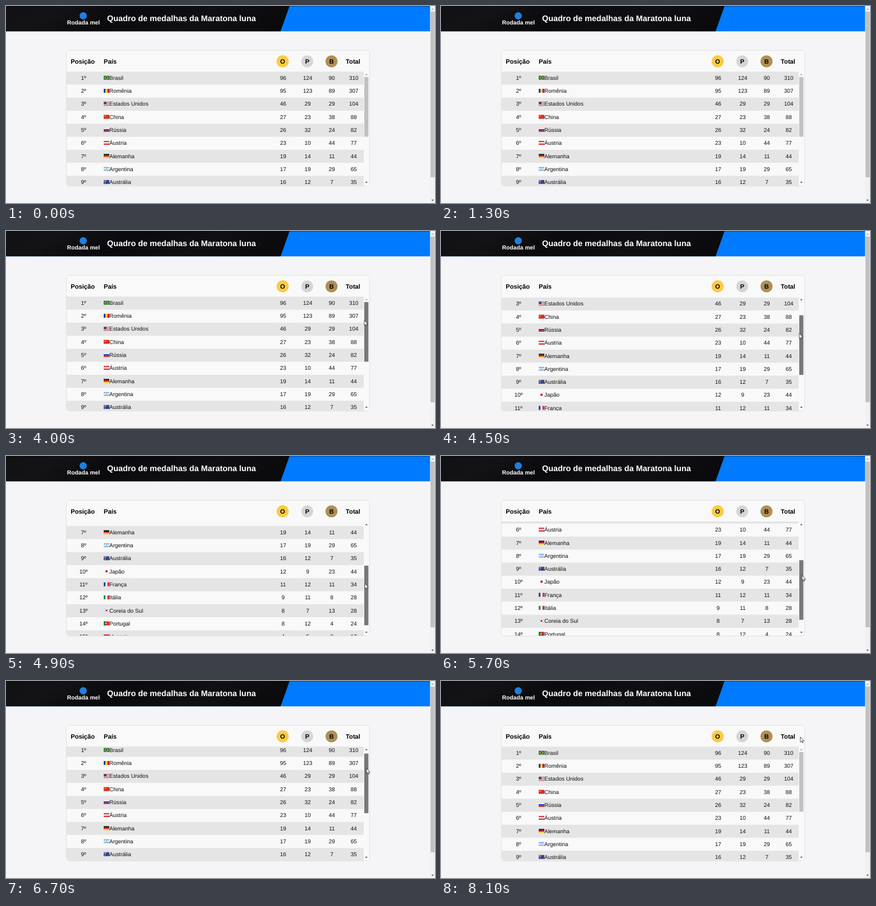
An HTML page for the animation above (8.2 s loop, 764 by 352 pixels).

```html
<!DOCTYPE html>
<html lang="pt-BR">
<head>
<meta charset="utf-8">
<title>Quadro de medalhas</title>
<style>
  html, body { margin: 0; width: 100%; height: 100%; overflow: hidden; background: #f5f5f7; }
  svg { display: block; font-family: "Liberation Sans", Arial, sans-serif; text-rendering: geometricPrecision; }
  .head { font-size: 11.2px; font-weight: bold; }
  .cell { font-size: 9.95px; fill: #101010; }
  .mid { text-anchor: middle; }
</style>
</head>
<body>
<svg width="764" height="352" viewBox="0 0 764 352">
  <defs>
    <clipPath id="view"><path d="M108 117H647V316Q647 321 642 321H113Q108 321 108 316Z"/></clipPath>
    <linearGradient id="ink" x2="1" y2=".15">
      <stop offset="0" stop-color="#111113"/>
      <stop offset=".2" stop-color="#131315"/>
      <stop offset=".45" stop-color="#0a0a0c"/>
      <stop offset=".75" stop-color="#101012"/>
      <stop offset="1" stop-color="#0b0b0d"/>
    </linearGradient>
    <filter id="soft" x="-5%" y="-5%" width="110%" height="110%">
      <feDropShadow dx="0" dy="0" stdDeviation="1.2" flood-opacity=".2"/>
    </filter>
  </defs>

  <rect width="764" height="352" fill="#f5f5f7"/>
  <rect width="755.500" height="45.300" fill="#007afe"/>
  <path d="M0 0H505L489 45.300H0Z" fill="url(#ink)"/>
  <rect width="755" height="1" opacity=".4"/>
  <circle cx="137.500" cy="17.500" r="6.500" fill="#1f7fe0"/>
  <text class="mid" x="138" y="32.500" font-size="10.300" font-weight="bold" fill="#fff">Rodada mel</text>
  <text x="180" y="27.200" font-size="14.420" font-weight="bold" fill="#fff">Quadro de medalhas da Maratona luna</text>

  <rect x="755.500" width="8.500" height="352" fill="#f1f1f1"/>
  <rect x="756" y="10" width="7.500" height="296" fill="#c1c1c1"/>
  <path d="M757.500 6.500l2.200-2.500 2.200 2.500z" fill="#a3a3a3"/>
  <path d="M757.500 346l2.200 2.500 2.200-2.500z" fill="#505050"/>

  <rect x="108" y="80" width="539" height="241" rx="5" fill="#f9f9f9" filter="url(#soft)"/>
  <g class="head mid">
    <circle cx="492.700" cy="98.900" r="10.800" fill="#fbcb47"/>
    <circle cx="536.500" cy="98.900" r="10.600" fill="#d5d5d5"/>
    <circle cx="579.700" cy="98.900" r="10.700" fill="#b08f55"/>
    <text x="136.700" y="103">Posição</text>
    <text x="185.500" y="103">País</text>
    <text x="492.700" y="103">O</text>
    <text x="536.500" y="103">P</text>
    <text x="579.700" y="103">B</text>
    <text x="618" y="103">Total</text>
  </g>
  <g clip-path="url(#view)">
    <g id="rows"></g>
    <rect x="637" y="117" width="10" height="204" fill="#f9f9f9"/>
    <path id="up" d="M639.600 123.500l2.200-2.500 2.200 2.500z"/>
    <path d="M639.600 314l2.200 2.500 2.200-2.500z" fill="#505050"/>
    <rect id="thumb" x="638" y="127" width="7.400" height="106.500"/>
  </g>
  <path id="cursor" d="M0 0V9.300L2.100 7.400 3.500 10.600 5 9.900 3.600 6.900H6.500Z" fill="#fff" stroke="#222" stroke-width=".8"/>
</svg>
<script>
const $ = id => document.getElementById(id);
const LOOP = 8200, STEP = 100, PITCH = 23.28, MAX = 147;

const rect = (x, y, w, h, c) => `<rect x="${x}" y="${y}" width="${w}" height="${h}" fill="${c}"/>`;
const dot = (x, y, r, c) => `<circle cx="${x}" cy="${y}" r="${r}" fill="${c}"/>`;
const bars = (...cs) => cs.map((c, i) => rect(0, i * 7 / cs.length, 10, 7 / cs.length, c)).join('');
const poles = (...cs) => cs.map((c, i) => rect(i * 10 / cs.length, 0, 10 / cs.length, 7, c)).join('');

const flags = {
  br: bars('#23762f') + '<path d="M5 .8L9 3.500 5 6.200 1 3.500z" fill="#e6c935"/>' + dot(5, 3.5, 1.6, '#22387f'),
  ro: poles('#1b3f94', '#f7d117', '#ce1126'),
  us: bars('#c8313e', '#eee', '#c8313e', '#eee', '#c8313e', '#eee', '#c8313e') + rect(0, 0, 5, 4, '#3c4a86'),
  cn: bars('#dc2a1c') + dot(2.4, 2.4, 1, '#f7cf2e') + dot(4.4, 1.5, .4, '#f7cf2e') + dot(4.4, 3.3, .4, '#f7cf2e'),
  ru: bars('#eee', '#1a30c0', '#d01c1f'),
  at: bars('#d8343f', '#eee', '#d8343f'),
  de: bars('#111', '#c81a1e', '#f5c518'),
  ar: bars('#84b9e3', '#eee', '#84b9e3') + dot(5, 3.5, .9, '#e8b64a'),
  au: bars('#1d3a84') + '<path d="M0 0L5 3.600M5 0L0 3.600M2.500 0V3.600M0 1.800H5" stroke="#e8808a" stroke-width=".8"/>'
    + dot(2.5, 5.4, .8, '#fff') + dot(7.5, 1.4, .5, '#fff') + dot(7.5, 5.5, .5, '#fff') + dot(8.8, 3, .4, '#fff'),
  jp: bars('#f6f6f6') + dot(5, 3.5, 2.1, '#c8152f'),
  fr: poles('#2444a0', '#eee', '#e0323f'),
  it: poles('#15914a', '#eee', '#cf2b37'),
  kr: bars('#f2f2f2') + dot(5, 3.5, 1.7, '#b8323f') + '<path d="M3.300 3.500a1.700 1.700 0 0 0 3.400 0z" fill="#234a94"/>'
    + '<path d="M1.300 1.800l1-1M7.700 .8l1 1M1.300 5.200l1 1M7.700 6.200l1-1" stroke="#333" stroke-width=".9"/>',
  pt: bars('#d7282f') + rect(0, 0, 4, 7, '#1d7a36') + dot(4, 3.5, 1.4, '#f3d23b'),
  hu: bars('#cf2b3e', '#eee', '#3f7a50')
};

const table = [
  ['br', 'Brasil', 96, 124, 90], ['ro', 'Romênia', 95, 123, 89],
  ['us', 'Estados Unidos', 46, 29, 29], ['cn', 'China', 27, 23, 38],
  ['ru', 'Rússia', 26, 32, 24], ['at', 'Áustria', 23, 10, 44],
  ['de', 'Alemanha', 19, 14, 11], ['ar', 'Argentina', 17, 19, 29],
  ['au', 'Austrália', 16, 12, 7], ['jp', 'Japão', 12, 9, 23],
  ['fr', 'França', 11, 12, 11], ['it', 'Itália', 9, 11, 8],
  ['kr', 'Coreia do Sul', 8, 7, 13], ['pt', 'Portugal', 8, 12, 4],
  ['hu', 'Hungria', 4, 5, 8]
];

const text = (x, s, cls = 'cell mid') => `<text class="${cls}" x="${x}" y="14.700">${s}</text>`;

$('rows').innerHTML = table.map(([flag, name, o, p, b], i) =>
  `<g transform="translate(0 ${117.2 + PITCH * i})">`
  + (i % 2 ? '' : rect(108, 0, 529, PITCH, '#e5e5e6'))
  + `<g transform="translate(174 7.500)">${flags[flag]}</g>`
  + text(138, i + 1 + 'º') + text(184, name, 'cell')
  + text(493.5, o) + text(537.3, p) + text(580.3, b) + text(619.3, o + p + b)
  + '</g>').join('');

// Linear interpolation over [time, value, ...] keys
function at(keys, t) {
  const n = keys.findIndex(k => k[0] > t);
  if (n === 0) return keys[0].slice(1);
  if (n < 0) return keys[keys.length - 1].slice(1);
  const a = keys[n - 1], b = keys[n], u = (t - a[0]) / (b[0] - a[0]);
  return a.slice(1).map((v, i) => v + (b[i + 1] - v) * u);
}

const scroll = [[4100, 0], [4500, 45], [4900, 131.7], [5100, MAX], [5500, MAX], [6000, 62], [6700, 5], [6800, 0]];
const pointer = [
  [2000, 575, 225], [2500, 632, 152], [3100, 632, 153], [3600, 638, 158], [4100, 638, 160],
  [4500, 638, 183], [4900, 639, 228], [5100, 641, 237], [5500, 643, 232], [6000, 643, 185],
  [6700, 642, 156], [7300, 641, 106], [7800, 641, 106], [8100, 640, 100]
];

function draw(now) {
  const t = Math.floor(now % LOOP / STEP) * STEP;
  const [s] = at(scroll, t), [x, y] = at(pointer, t);
  $('rows').setAttribute('transform', `translate(0 ${-s})`);
  $('thumb').setAttribute('transform', `translate(0 ${s / 1.91})`);
  $('thumb').setAttribute('fill', t >= 4000 && t < 7900 ? '#787878' : t >= 3500 && t < 4000 ? '#a8a8a8' : '#c1c1c1');
  $('up').setAttribute('fill', s > 0 ? '#505050' : '#a3a3a3');
  $('cursor').setAttribute('transform', `translate(${x} ${y})`);
  $('cursor').setAttribute('visibility', t < 2000 ? 'hidden' : 'visible');
}

let start;
function tick(now) {
  start ??= now;
  draw(now - start);
  requestAnimationFrame(tick);
}
draw(0);
requestAnimationFrame(tick);
</script>
</body>
</html>
```
